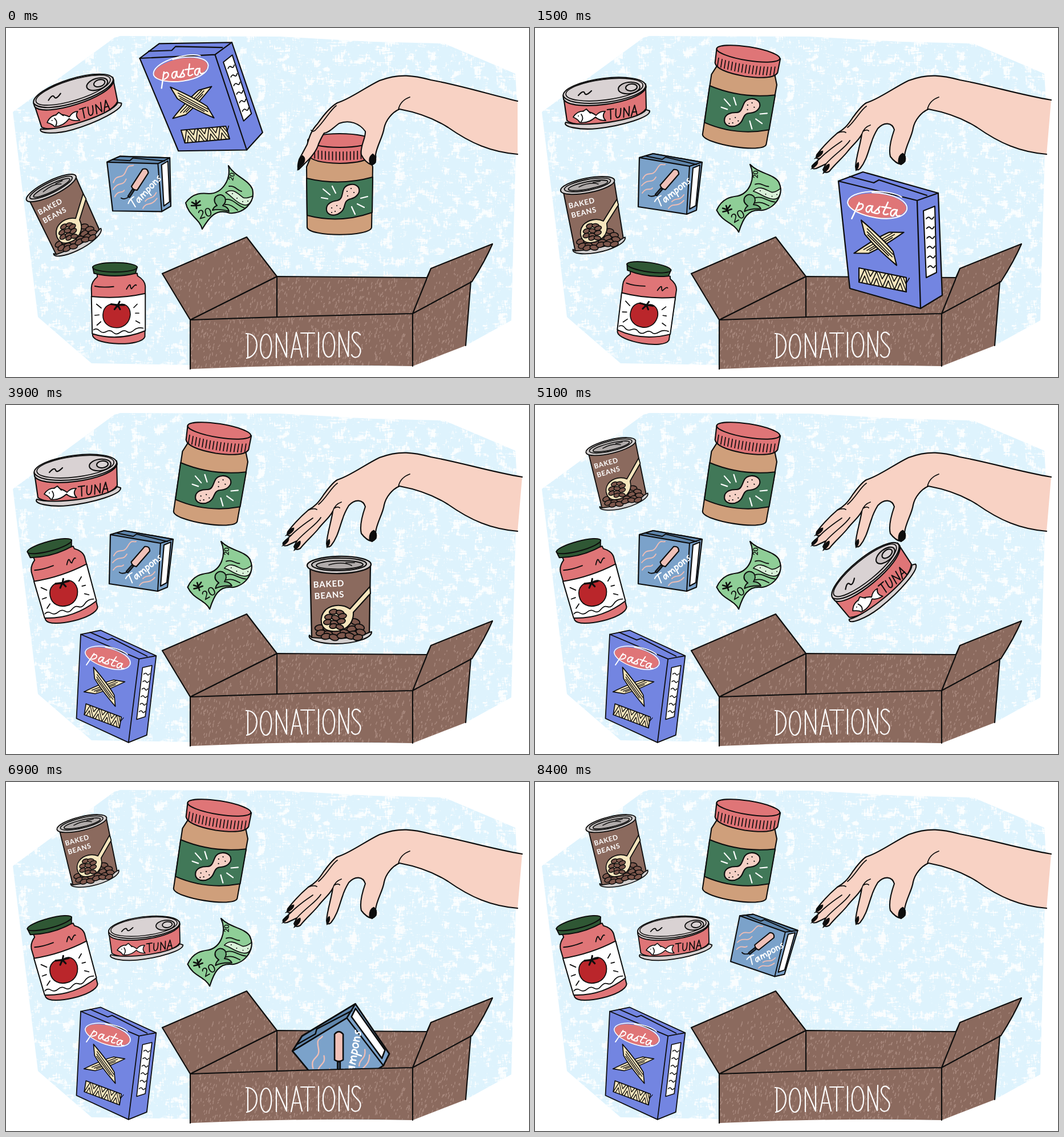
An HTML page that plays this animation: 917x611 px, repeating every 8700 ms.

```html
<!DOCTYPE html>
<html lang="en">
<head>
<meta charset="utf-8">
<title>Donations</title>
<style>
html, body { margin: 0; width: 100%; height: 100%; overflow: hidden; background: #fff; }
svg { position: absolute; left: 0; top: 0; width: 917px; height: 611px; stroke-linecap: round; stroke-linejoin: round; }
#paper { will-change: transform; }
text { font-family: Lato, "Open Sans", sans-serif; }
</style>
</head>
<body>
<svg id="paper" viewBox="0 0 917 611">
  <defs>
    <filter id="grain" x="0" y="0" width="1" height="1" color-interpolation-filters="sRGB">
      <feTurbulence type="fractalNoise" baseFrequency=".05 .06" numOctaves="5" seed="4" result="clump"/>
      <feTurbulence type="fractalNoise" baseFrequency=".07 .4" numOctaves="2" seed="9" result="weft"/>
      <feTurbulence type="fractalNoise" baseFrequency=".4 .07" numOctaves="2" seed="2" result="warp"/>
      <feComposite in="weft" in2="warp" operator="arithmetic" k2=".5" k3=".5" result="weave"/>
      <feComposite in="clump" in2="weave" operator="arithmetic" k2=".5" k3=".5"/>
      <feColorMatrix values="0 0 0 0 1  0 0 0 0 1  0 0 0 0 1  0 0 0 13 -6.95"/>
    </filter>
    <clipPath id="blob"><path d="M12,147L190,17L200,14L480,15L640,24L768,27L893,80L896,130L886,512L806,556L700,592L322,590L150,587L56,506Z"/></clipPath>
  </defs>
  <g clip-path="url(#blob)">
    <rect width="917" height="611" fill="#def3fd"/>
    <rect width="917" height="611" filter="url(#grain)" opacity=".85"/>
  </g>
</svg>
<svg id="stage" viewBox="0 0 917 611"></svg>
<script>
const INK = '#0d0d0d', RED = '#df7577', CREAM = '#f5e5bd', BROWN = '#8b6a5e', SKIN = '#f8d2c4';

const path = (d, fill = 'none', stroke = INK, w = 2.1) =>
  `<path d="${d}" fill="${fill}" stroke="${stroke}" stroke-width="${w}"/>`;
const oval = (x, y, rx, ry, fill = 'none', turn = 0, stroke = INK, w = 2.1) =>
  `<ellipse rx="${rx}" ry="${ry}" fill="${fill}" stroke="${stroke}" stroke-width="${w}" transform="translate(${x},${y}) rotate(${turn})"/>`;
const group = (transform, inner) => `<g transform="${transform}">${inner}</g>`;
const word = (s, x, y, size, turn, fill, extra = '') =>
  `<text transform="translate(${x},${y}) rotate(${turn})" font-size="${size}" fill="${fill}" ${extra}>${s}</text>`;
const lettering = (label, d, color, w, transform = '') =>
  `<g aria-label="${label}" transform="${transform}">${path(d, 'none', color, w)}</g>`;
const repeat = (n, fn) => Array.from({ length: n }, (_, i) => fn(i)).join('');

let seed = 7;
const random = () => (seed = seed * 16807 % 2147483647) / 2147483647;

function peanutButter() {
  const ridges = repeat(17, i => {
    const x = -50 + i * 6.25, sag = 9 * Math.sqrt(1 - (x / 58) ** 2);
    return `M${x},${-65 + sag}v14`;
  });
  return path('M-51,-46L-58,-30L-57,76C-54,93 54,93 56,76L58,-30L52,-46Z', '#cf9f7b')
    + path('M-58,-10Q0,4 58,-12L57,50Q0,70 -57,55Z', '#417858')
    + path('M-56,-76L-55,-51Q-50,-37 0,-36Q50,-37 56,-51L57,-76Z', RED)
    + oval(0, -76, 56, 12, RED) + path(ridges, 'none', INK, 1.7)
    + path('M-23,46C-25,34 -12,30 -4,29C4,27 4,20 6,12C9,0 26,-3 33,6C38,16 28,24 20,26C11,28 10,32 8,40C4,56 -20,60 -23,46Z', '#f5d0c5')
    + path('M-14,42h.1M-8,48h.1M-5,38h.1M13,13h.1M20,8h.1M25,15h.1M-14,50h.1M14,21h.1M1,43h.1', 'none', INK, 2.2)
    + path('M-29,9L-17,19M-13,4L-7,16M-32,24L-21,26M37,25L49,22M31,35L43,41M21,40L27,53', 'none', '#fff', 2.2);
}

function pasta() {
  const penne = (turn, half) => group(`translate(-22,4) rotate(${turn})`,
    path(`M${-half},-6Q0,-10 ${half - 22},-7L${half},6Q0,10 ${22 - half},7Z`, CREAM)
    + path(`M${18 - half},-3H${half - 18}M${22 - half},1H${half - 16}M${26 - half},4H${half - 22}`, 'none', INK, 1.6));
  const noodles = repeat(4, i => {
    const x = i * 20.75;
    return `M${x},25l10,-25l10.75,25M${x + 5},25l5,-13l5,13M${x + 15},0l5,11l6,-11`;
  });
  const script = 'M2,-14L-6,14M0,-9C9,-19 15,-5 1,-1M25,-11C14,-16 12,2 20,-1L25,-12Q22,1 29,-2'
    + 'L37,-13Q33,-9 37,-5Q39,0 29,-1M49,-22L44,-4Q45,1 52,-3M40,-13H55M66,-11C55,-16 53,2 61,-1L66,-12Q63,1 72,-3';
  return path('M-93,-104L-50,-120L82,-83L89,96L51,119L-73,84Z', '#7385e1', INK, 2.3)
    + path('M-93,-104L45,-70L51,119M45,-70L82,-83M-73,-112L-31,-101L-22,-106L62,-79', 'none', INK, 2.3)
    + oval(-25, -61, 51, 21, RED, 6, 'none')
    + path('M18,-76C-4,-91 -76,-90 -77,-66C-73,-42 17,-24 27,-54C30,-69 3,-83 -34,-84', 'none', '#fff', 1.9)
    + lettering('pasta', script, '#fff', 2.4, 'translate(-61,-52) rotate(9) scale(1.06)')
    + penne(-30, 47) + penne(45, 50)
    + group('translate(-57,48) skewY(11.5)', path('M0,0H83V25H0Z', CREAM) + path(noodles, 'none', INK, 1.6))
    + path('M56,-52L76,-60L79,56L61,65Z', '#fff')
    + path(repeat(6, i => `M${61 + i * .6},${-38 + i * 17}q4,-5 7,-1t6,-2`), 'none', INK, 1.9);
}

function sauce() {
  return path('M-50,-70L-49,-62Q-64,-50 -63,-34L-60,76C-54,98 54,102 62,78L63,-40Q62,-54 45,-64L44,-70Z', RED, INK, 2.6)
    + path('M-63,-16Q0,-9 63,-23L63,64Q0,90 -61,71Z', '#fff', INK, 2.6)
    + path('M-60,-85L-57,-70Q-8,-58 40,-70L44,-85Z', '#2f5734', INK, 2.6)
    + oval(-8, -84, 52, 11, '#2f5734', 0, INK, 2.6)
    + path('M-55,-40Q-38,-36 -11,-39M19,-33Q27,-48 28,-41T31,-34Q40,-46 42,-42', 'none', INK, 2.4)
    + path('M-4,6C14,-5 28,8 28,26C26,48 10,57 -4,57C-22,57 -37,46 -36,26C-35,7 -19,-4 -4,6Z', '#ba262b', INK, 2.2)
    + path('M-2,6L3,-4M-1,4L-17,2M-1,4L-9,14M-1,5L4,14M-1,4L14,4', 'none', INK, 4)
    + path('M-51,2L-40,11M-55,28L-45,27M-50,51L-41,43M44,2L36,10M48,23L40,23M50,46L41,41', 'none', INK, 2.3)
    + path('M-58,62Q-51,57 -44,64T-28,66T-12,68T4,68T20,66T36,63T58,58', 'none', INK, 2.2);
}

function beans() {
  const bean = (x, y, turn, size = 1) => oval(x, y, 8.5 * size, 5.2 * size, '#7d574c', turn, INK, 1.9);
  const row = (n, x, y, size = 1) => repeat(n, i => bean(x + i * 14 * size, y + Math.sin(i * 2) * 2, i % 2 * 25 - 8, size));
  return path('M-53,-62L-50,66Q0,84 51,60L53,-62Z', BROWN, INK, 2.3)
    + path('M-54,62C-58,70 -35,77 -8,77C25,77 56,67 55,56L51,57Q20,72 -50,66Z', '#d2cecd')
    + oval(-2, -61, 56, 15, '#d2cecd', -1, INK, 2.3) + oval(-2, -62, 48, 11, '#c3bfbe', -1)
    + oval(-1, -61, 41, 7.5, '#b0abaa', -1) + path('M-20,-61Q4,-68 20,-60M10,-65h15', 'none', INK, 1.7)
    + word('BAKED', -47, -21, 15, -3, '#fff', 'font-weight="700" letter-spacing=".8"')
    + word('BEANS', -45, -1, 15, -4, '#fff', 'font-weight="700" letter-spacing=".8"')
    + row(4, -16, 39) + row(6, -36, 49) + row(6, -34, 58) + row(5, -25, 64)
    + path('M52,-23L53,-11L23,22C24,46 3,57 -14,55C-36,54 -39,30 -25,17C-12,7 6,8 17,16Z', CREAM)
    + row(2, -12, 21, .85) + row(3, -20, 30, .85) + row(3, -22, 39, .85) + row(2, -12, 46, .8);
}

function tuna() {
  const caps = 'M0,-17H12M6,-17L4,1M16,-16L14,-5Q14,1 18,0Q23,-1 25,-16M28,1L31,-16L38,0L41,-17M42,1L51,-18L53,0M45,-6H53';
  return path('M-74,-11L-68,31C-50,47 55,35 71,10L70,-33Z', RED)
    + path('M-70,34C-77,42 -45,48 -15,45C30,40 79,25 77,14L71,12C58,31 -42,44 -70,34Z', '#d8d1d1')
    + group('rotate(-7,-2,-20)', oval(-2, -21, 73, 22, '#d5cdce') + path('M-75,-21V-15C-65,9 58,9 71,-18V-21'
      + 'C63,5 -63,7 -75,-21Z', '#d5cdce') + oval(-2, -23, 68, 18, '#d9d2d3', 0, INK, 1.7))
    + oval(41, -26, 19, 10, '#c9c1c2', -7) + oval(45, -27, 10, 6, '#d9d2d3', -7)
    + path('M-48,-13Q-39,-23 -37,-17T-25,-21', 'none', INK, 2.2)
    + path('M-57,25Q-49,12 -33,15Q-23,17 -17,22Q-10,14 -1,15Q-8,23 0,31Q-12,31 -18,25Q-31,37 -46,34Q-47,30 -57,25Z', '#fff', INK, 1.8)
    + path('M-40,15l6,-4l7,7M-48,23h.1M-43,33Q-38,27 -43,20', '#fff', INK, 1.8)
    + lettering('TUNA', caps, INK, 2.1, 'translate(5,28) rotate(-8) scale(.95)');
}

function tampons() {
  const script = 'M0,-12Q6,-15 14,-13M8,-14L4,0M19,-6C12,-9 11,1 15,0L19,-7L19,0M23,0L24,-7M24,-4Q28,-10 28,0M28,-4Q33,-10 33,0'
    + 'M37,-7L35,6M37,-6C43,-9 43,1 36,0M47,-7C42,-6 44,1 47,0C51,-1 51,-7 47,-7M53,0V-7M53,-4Q58,-10 58,0M66,-7Q60,-6 64,-3Q66,0 61,0';
  return path('M-53,-46L-29,-53L57,-38L47,46L30,53L-55,40Z', '#7ba2ca', INK, 2.2)
    + path('M-53,-46L-29,-53L57,-38L35,-31Z', '#5f86ad', INK, 2.2)
    + path('M35,-31L30,53M-43,-49L-13,-43L-7,-47L47,-34', 'none', INK, 2)
    + path('M41,-28L53,-33L46,38L35,44Z', '#fff')
    + path('M-47,-9C-39,-25 -31,-11 -23,-25S-14,-32 -8,-34M-49,3C-38,-11 -31,1 -24,-12M-48,16C-40,4 -34,13 -30,7'
      + 'M-2,43C6,31 12,43 25,29M4,31C11,23 17,31 25,19', 'none', '#eebdb5', 1.9)
    + group('translate(-12,6) rotate(41)', path('M-6,-36Q0,-43 6,-36L6,0Q0,4 -6,0Z', '#f0c1b8')
      + path('M-2,3H2V18H-2Z', '#2e3d4d', INK, 1.7) + path('M0,18Q-4,27 -10,27', 'none', INK, 1.8))
    + lettering('Tampons', script, '#fff', 1.9, 'translate(-18,41) rotate(-39) scale(1.08)');
}

function cash() {
  const edge = 'M-59,9C-45,-10 -28,-8 -18,-7C4,-7 21,-30 16,-56C27,-37 52,-31 58,-15C64,10 40,29 18,27C-6,18 -18,35 -30,55C-35,36 -54,32 -59,9Z';
  return path(edge, '#8fce97')
    + path('M11,-9C25,-18 33,-6 42,0C48,2 54,-1 59,-3C55,12 49,15 41,12C28,8 22,-3 11,-9Z', '#d8f0d8', INK, 1.6)
    + path('M17,-20C29,-21 30,-13 39,-11M12,3C25,2 32,15 44,18M10,12C20,11 27,18 32,22M23,-7h.1M31,1h.1M41,7h.1M50,6h.1', 'none', INK, 1.8)
    + path('M-12,22Q-9,15 -4,14Q-12,5 -6,-2Q3,-9 10,0Q13,8 6,14Q15,16 17,24Q0,19 -12,22Z', '#74b581', INK, 2)
    + path('M-40,19L-41,5M-41,12L-48,8M-41,12L-34,6M-41,14L-49,14M-41,14L-33,13', 'none', INK, 2.6)
    + word('20', -35, 38, 21, -17, INK) + word('20', 24, -29, 12, -76, INK, 'font-weight="700"');
}

function hands() {
  const arm = 'C850,117 800,101 745,91C715,83 690,79 655,92C630,104 602,125 581,131';
  const back = 'C666,162 676,148 690,142C722,148 750,158 775,174C815,202 850,217 897,221';
  const crease = 'M708,121C697,125 690,132 688,143';
  const open = path(`M905,126${arm}C572,136 563,149 557,157C548,171 541,178 530,184C516,196 503,210 494,222`
      + 'Q491,231 500,228L486,241Q484,248 493,246L510,238L505,248Q508,256 516,251C528,236 541,226 549,215C559,203 568,196 573,186'
      + 'C570,206 563,225 562,243Q564,252 570,246C582,231 585,213 590,200C593,190 598,181 601,176C612,164 626,165 630,178'
      + `C624,195 620,213 623,225Q632,237 642,239Q651,232 648,223C650,206 661,190 663,175${back}`, SKIN)
    + path(`${crease}M581,137C571,143 561,164 548,174M530,184Q540,180 545,183M500,228C515,213 526,206 538,198M510,238C527,219 544,210 552,197`
      + 'M573,186C576,176 582,172 588,170M575,181Q582,177 585,180', 'none', INK, 1.8)
    + path('M493,226Q495,216 505,215Q505,224 490,229ZM486,245Q486,236 496,233Q497,241 484,247Z'
      + 'M506,252Q507,240 516,238Q518,247 505,255ZM562,247Q563,236 567,235Q570,242 563,250ZM637,237Q636,222 645,219Q652,224 649,234Q644,241 637,237Z', INK, INK, 1);
  const grip = path(`M897,128${arm}C567,139 555,155 546,168C536,178 532,190 528,204L514,230Q510,244 513,248`
      + 'L523,238C536,226 545,214 548,203C552,194 555,188 558,184C567,183 574,174 584,167C602,160 620,167 630,181'
      + `C631,193 620,208 623,222Q630,236 642,240Q650,233 648,222C650,207 661,190 663,175${back}`, SKIN)
    + path(`${crease}M579,136C569,143 559,162 545,176Q539,184 535,179`, 'none', INK, 1.8)
    + path('M511,249Q512,228 520,223Q527,228 522,237ZM638,238Q634,226 643,220Q651,225 648,236Q643,242 638,238Z', INK, INK, 1);
  return `<g id="open">${open}</g><g id="grip">${grip}</g>`;
}

const flecks = (n, x, y, w, h) => path(repeat(n, () =>
  `M${(x + random() * w).toFixed(1)},${(y + random() * h).toFixed(1)}l${(random() * 1.6).toFixed(1)},${(-1 - random() * 4).toFixed(1)}`), 'none', '#b3958a', 1.5);
const panel = (id, d, n, area) => `<clipPath id="${id}"><path d="${d}"/></clipPath>` + path(d, BROWN, 'none')
  + `<g clip-path="url(#${id})" opacity=".72">${flecks(n, ...area)}</g>`;

const boxBack = () => panel('inside', 'M323,511L475,435L738,437L713,502Z', 480, [330, 435, 400, 75])
  + path('M323,511L475,435L738,437M475,435V507');
const boxFront = () => panel('front', 'M323,511L713,500L815,444L806,556L713,592Q520,588 323,597Z', 1300, [323, 450, 492, 147])
  + panel('flapL', 'M274,430L422,366L475,435L323,511Z', 340, [274, 366, 200, 145])
  + panel('flapR', 'M745,421L853,378Q840,408 817,444L713,500Z', 150, [713, 378, 140, 122])
  + path('M274,430L422,366L475,435L323,511ZM323,511V597M323,511Q520,504 713,500V592M738,437L745,421L853,378Q840,408 817,444L713,500L745,421M815,444L806,556')
  + lettering('DONATIONS', 'M424,536V577M421,535C446,534 446,574 422,578M456,536C443,537 443,578 456,578C469,577 468,536 456,536'
    + 'M474,577V535L492,576V533M500,577L509,533L519,576M503,562H516M517,534H541M529,534V576M548,533V576'
    + 'M566,533C552,535 553,576 566,576C580,575 579,534 566,533M584,576V533L600,575L601,531'
    + 'M621,537C612,526 603,538 609,547C614,556 624,558 621,569C618,579 609,578 606,572', '#fff', 2.2);

// Poses are [x, y, turn, scale]; drop is the first falling pose, spin the turn per falling step,
// sway the extra turn while the hand grips.
const items = [
  { draw: peanutButter, hold: [585, 273, 0, 1], drop: [585, 352, 0, 1], spin: -8, next: [362, 120, 9, 1], sway: -8 },
  { draw: pasta, home: [345, 121, -8.6, .93], hold: [605, 303, -4, 1], drop: [625, 372, 0, 1], spin: 6, next: [190, 493, 9, .78], sway: -8 },
  { draw: sauce, home: [197, 482, 8, .75], hold: [588, 283, 0, 1], drop: [588, 360, 0, 1], spin: -8, next: [99, 308, -15, .77], sway: -8 },
  { draw: beans, home: [103, 327, -10, .86], hold: [586, 262, 0, 1], drop: [586, 341, 0, 1], spin: 8, next: [145, 120, -12.5, .8], sway: -15 },
  { draw: tuna, home: [124, 131, 0, 1], hold: [590, 238, -12, 1.02], drop: [593, 308, -32, 1.02], spin: -8, next: [244, 273, 0, .86], sway: -10 },
  { draw: tampons, home: [236, 273, 0, 1], hold: [588, 252, 0, 1.25], drop: [590, 331, -9, 1.25], spin: -16, next: [401, 286, 10, .95], sway: -8 },
  { draw: cash, home: [374, 297, -13, 1], hold: [588, 252, 0, 1.15], drop: [590, 325, -10, 1.15], spin: -12, sway: 13 }
];
const STEP = 300, STEPS = 29, FALL = 70;

const stage = document.getElementById('stage');
stage.innerHTML = '<clipPath id="floor"><path d="M0,0H917V593H0Z"/></clipPath>' + boxBack()
  + `<g clip-path="url(#floor)">${items.map((it, i) => `<g id="item${i}">${it.draw()}</g>`).join('')}</g>`
  + hands() + boxFront();
const nodes = items.map((_, i) => document.getElementById('item' + i));
const show = (node, on) => node.setAttribute('visibility', on ? 'visible' : 'hidden');

function poseAt(item, phase, gripping) {
  if (phase === 0) return item.hold;
  if (phase > 0 && phase < 4) {
    const [x, y, turn, scale] = item.drop, n = phase - 1;
    return [x, y + n * FALL, turn + n * item.spin, scale];
  }
  const slot = phase < 0 ? item.home : item.next;
  if (!slot) return null;
  const [x, y, turn, scale] = slot;
  return [x, y, turn + (gripping ? item.sway : 0), scale];
}

function render(step) {
  const gripping = step % 4 === 0 && step < 4 * items.length;
  items.forEach((item, i) => {
    const pose = poseAt(item, step - 4 * i, gripping);
    show(nodes[i], pose);
    if (!pose) return;
    const [x, y, turn, scale] = pose;
    nodes[i].setAttribute('transform', `translate(${x},${y}) rotate(${turn}) scale(${scale})`);
  });
  show(document.getElementById('grip'), gripping);
  show(document.getElementById('open'), !gripping);
}

let shown = 0;
const start = performance.now();
function tick() {
  const step = Math.floor((performance.now() - start) / STEP) % STEPS;
  if (step !== shown) render(shown = step);
  requestAnimationFrame(tick);
}
render(0);
requestAnimationFrame(tick);
</script>
</body>
</html>
```
